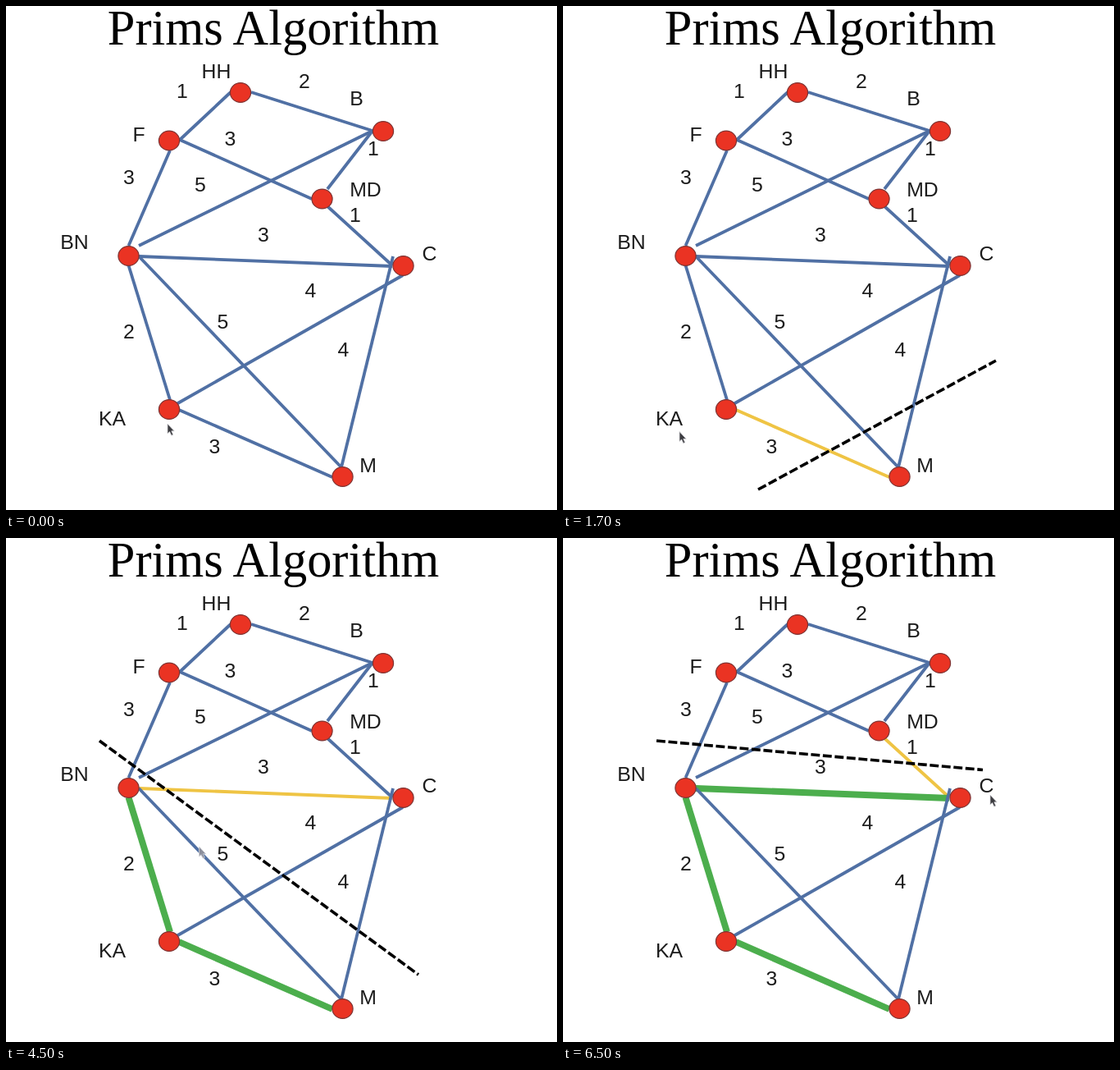
An HTML page that plays this animation: 672 px wide and 614 px high, repeating every 8000 ms.

```html
<!DOCTYPE html>
<html lang="en">
<head>
<meta charset="utf-8">
<title>Prims Algorithm</title>
<style>
  html, body { margin: 0; width: 100%; height: 100%; overflow: hidden; background: #fff; }
  svg { display: block; width: 100%; height: 100%; }
  text { text-anchor: middle; fill: #1c1c1c; }
  .title { font: 60.4px "Liberation Serif", "Times New Roman", serif; fill: #000; }
  .label { font: 24.8px "Liberation Sans", Arial, sans-serif; }
</style>
</head>
<body>
<svg id="stage" viewBox="0 0 672 614">
  <rect width="672" height="614" fill="#fff"/>
  <text class="title" x="326" y="46.5">Prims Algorithm</text>
</svg>
<script>
const stage = document.getElementById('stage');
const LOOP = 8000;

// id: x, y, label x, label y (centres)
const nodes = {
  HH: [286, 105.5, 256.5, 80],
  B: [460, 152.5, 427.5, 113.5],
  F: [199, 164, 162, 157.5],
  MD: [385.5, 235, 438.5, 224.5],
  BN: [149.5, 304.5, 83.5, 288.5],
  C: [484.5, 316.5, 516.5, 302.5],
  KA: [199, 491.5, 129.5, 503],
  M: [410.5, 573.5, 441.5, 560.5]
};

// id: path, weight, weight x, weight y
const edges = {
  'F-HH': ['M212 163L274 105', 1, 215, 104],
  'HH-B': ['M299 105L447 152', 2, 364, 92],
  'F-MD': ['M212 163L373 235', 3, 273.5, 162],
  'BN-B': ['M162 292L447 152', 5, 237, 218],
  'B-MD': ['M447 152L392 223', 1, 448, 174.5],
  'F-BN': ['M200 176L149.5 292', 3, 150, 209],
  'MD-C': ['M392 244L471 316', 1, 426, 255.5],
  'BN-C': ['M162 305L471 317', 3, 314, 279],
  'KA-C': ['M206 486L484 328', 4, 371.5, 347],
  'BN-M': ['M162 305L409 562', 5, 264.5, 385],
  'C-M': ['M472 305L409 562', 4, 411.5, 419.5],
  'BN-KA': ['M149.5 316L200 480', 2, 150, 397],
  'KA-M': ['M211 492L398 574', 3, 254.5, 537]
};

// Edges in the order they join the tree
const order = ['KA-M', 'BN-KA', 'BN-C', 'MD-C'];

const steps = [
  { at: 0, cut: '', cursor: [197, 509] },
  { at: 500, cut: 'M238 589L528 432', cursor: [142, 518.5] },
  { at: 2500, cut: 'M139 450L521 488.5', cursor: [349, 500.5] },
  { at: 4500, cut: 'M114 247L503 532', cursor: [235.5, 376], faded: true },
  { at: 6500, cut: 'M114 247L512 282.5', cursor: [521, 313] }
];

const style = {
  plain: { stroke: '#5070a4', 'stroke-width': 3.8 },
  chosen: { stroke: '#efc444', 'stroke-width': 3.9 },
  tree: { stroke: '#4cae4d', 'stroke-width': 7.9 }
};

function set(el, attrs) {
  for (const key in attrs) el.setAttribute(key, attrs[key]);
  return el;
}

function add(tag, attrs) {
  return stage.appendChild(set(document.createElementNS('http://www.w3.org/2000/svg', tag), attrs));
}

function addLabel(text, x, y) {
  add('text', { class: 'label', x, y: y + 7.8 }).textContent = text;
}

const lines = {};
for (const id in edges) lines[id] = add('path', { d: edges[id][0], fill: 'none' });

for (const id in nodes) {
  const [cx, cy, x, y] = nodes[id];
  add('ellipse', { cx, cy, rx: 12.6, ry: 11.9, fill: '#ea3323', stroke: '#7c3434', 'stroke-width': 1.2 });
  addLabel(id, x, y);
}
for (const id in edges) addLabel(...edges[id].slice(1));

const cut = add('path', { fill: 'none', stroke: '#000', 'stroke-width': 3.6, 'stroke-dasharray': '10.9 3.65' });
const cursor = add('path', {
  d: 'M0 0V12L2.6 9.6L4.8 14.2L6.8 13.2L4.8 8.8H8.2Z',
  stroke: '#d5d5d8', 'stroke-width': 0.8
});

function draw(time) {
  const index = steps.findLastIndex(step => step.at <= time);
  const step = steps[index];
  for (const id in lines) {
    const rank = order.indexOf(id) + 1;
    const state = !rank || rank > index ? 'plain' : rank === index ? 'chosen' : 'tree';
    set(lines[id], style[state]);
  }
  set(cut, { d: step.cut });
  set(cursor, {
    transform: `translate(${step.cursor})`,
    fill: step.faded ? '#8c8f9c' : '#3c3c40'
  });
}

const start = performance.now();
function tick() {
  draw((performance.now() - start) % LOOP);
  requestAnimationFrame(tick);
}
tick();
</script>
</body>
</html>
```
